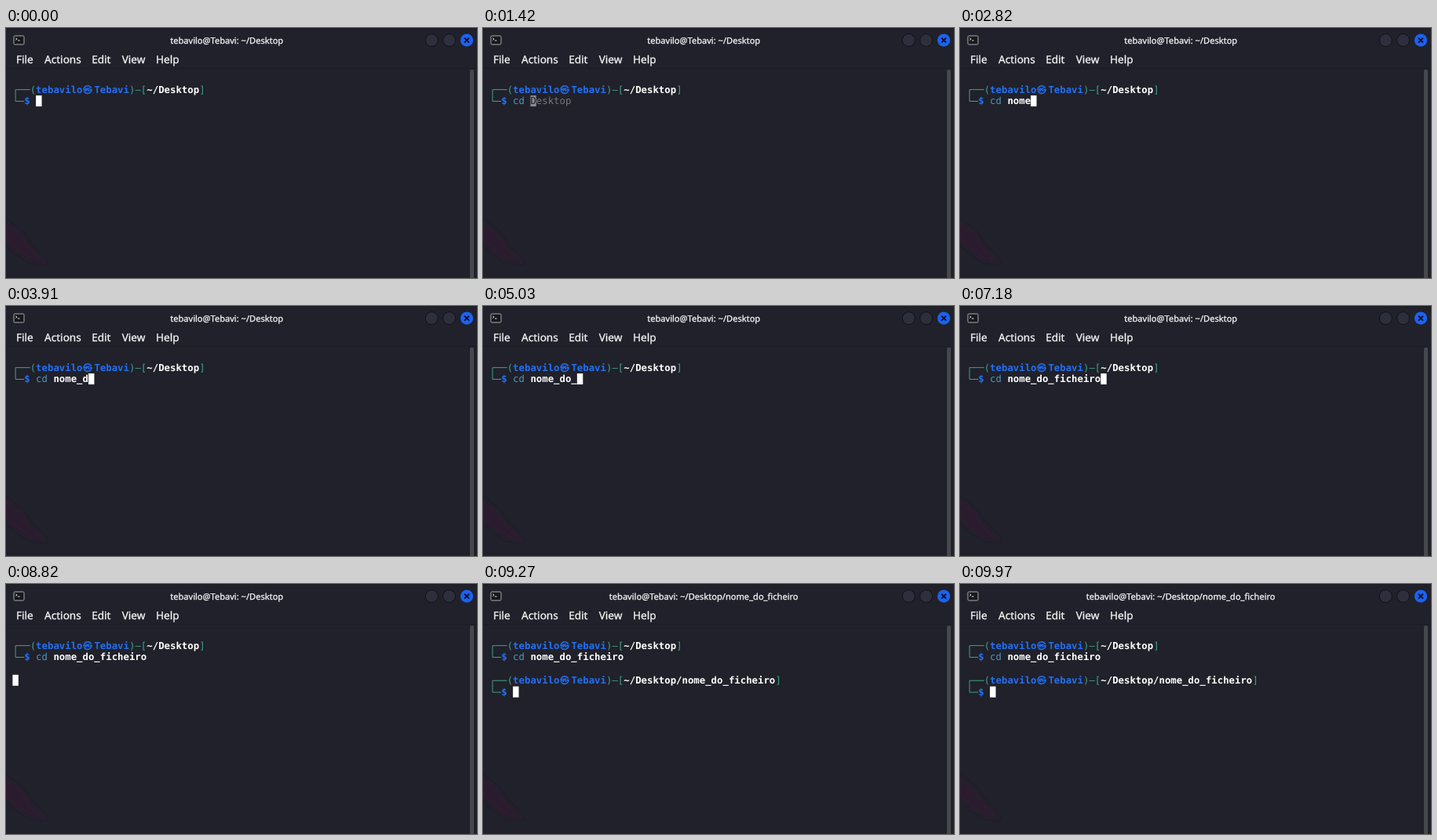
These frames come from a looping animation (600x319 px, 10 s). An HTML page:

```html
<!DOCTYPE html>
<html lang="en">
<head>
<meta charset="utf-8">
<title>Terminal</title>
<style>
  html, body { margin: 0; width: 100%; height: 100%; overflow: hidden; background: #20212a; }
  svg { display: block; width: 600px; height: 319px; text-rendering: geometricPrecision; }
  text { white-space: pre; }
  .ui { font-family: "Noto Sans", sans-serif; fill: #f4f4f5; stroke: #f4f4f5; stroke-width: .3; }
  .mono { font: 12.34px "DejaVu Sans Mono", monospace; }
  .cjk { font: 700 11.6px "Noto Sans CJK JP", "Noto Sans CJK", sans-serif; stroke: #2470f5; stroke-width: .4; }
  .bold { font-weight: 700; }
  .green { fill: #43a18a; }
  .blue { fill: #2470f5; }
  .cmd { fill: #4b98c6; }
  .white { fill: #fff; }
  .ghost { fill: #77787c; }
  .dark { fill: #20212a; }
</style>
</head>
<body>
<svg id="stage" viewBox="0 0 600 319">
  <defs>
    <filter id="soft"><feGaussianBlur stdDeviation="2"/></filter>
  </defs>
  <rect width="600" height="319" fill="#20212a"/>
  <path d="M0 .5H600M0 51.5H600" stroke="#1b1c24"/>
  <path d="M-4 243L20 262L30 277L52 300L32 298L12 285L-4 268Z" fill="#291d2f" filter="url(#soft)"/>
  <rect x="591" y="53" width="5" height="268" rx="2" fill="#47484c"/>

  <rect x="10" y="10" width="13" height="11" rx="1.2" fill="#17181d" stroke="#a9abad"/>
  <path d="M12.3 12.7l1.8 1.4-1.8 1.4M15 16h2.6" fill="none" stroke="#eee" stroke-width=".9"/>

  <g fill="#2d303c" stroke="#0f1016">
    <circle cx="542.3" cy="15.6" r="8"/>
    <circle cx="564.6" cy="15.6" r="8"/>
  </g>
  <circle cx="587" cy="15.6" r="8.1" fill="#1b62f2"/>
  <path d="M584 12.6l6 6m0-6l-6 6" stroke="#0b0f22" stroke-width="1.9"/>

  <text id="title" class="ui" x="281.2" y="19.5" font-size="11.1" text-anchor="middle"></text>
  <g class="ui" font-size="13.6">
    <text x="13" y="45.3">File</text>
    <text x="49" y="45.3">Actions</text>
    <text x="109.2" y="45.3">Edit</text>
    <text x="147.7" y="45.3">View</text>
    <text x="191" y="45.3">Help</text>
  </g>
  <g id="term"></g>
</svg>
<script>
const LOOP = 10000, ENTER = 8790, DONE = 8850;
const CELL = 7.43, ROW = 14.87, LEFT = 8.4, TOP = 71.2, ASCENT = 11.4;
const USER = 'tebavilo', HOST = 'Tebavi', HOME = '~/Desktop', DIR = 'nome_do_ficheiro';
const LINE = 'cd ' + DIR, HINT = 'cd Desktop';
const KEYS = [700, 950, 1250, 2000, 2230, 2450, 2700, 3400, 3850, 4130, 4750,
              5400, 5650, 5900, 6150, 6400, 6600, 6800, 7000];

const term = document.getElementById('term');
const title = document.getElementById('title');

function add(parent, tag, attrs, text) {
  const el = document.createElementNS('http://www.w3.org/2000/svg', tag);
  for (const k in attrs) el.setAttribute(k, attrs[k]);
  if (text) el.textContent = text;
  return parent.appendChild(el);
}
const px = col => LEFT + col * CELL;
const py = row => TOP + row * ROW;

function put(parent, col, row, text, cls) {
  return add(parent, 'text', { x: px(col), y: py(row) + ASCENT, class: 'mono ' + cls }, text);
}

function prompt(row, path) {
  const g = add(term, 'g', {});
  const x = px(.5), y = py(row) + ROW / 2;
  add(g, 'path', {
    d: `M${px(3)} ${y}H${x}V${y + ROW}H${px(2)}`,
    fill: 'none', stroke: '#43a18a', 'stroke-width': 1
  });
  put(g, 3, row, '(', 'green');
  put(g, 4, row, USER, 'blue bold');
  add(g, 'text', { x: px(12) + .6, y: py(row) + ASCENT, class: 'cjk blue' }, '㉿');
  put(g, 14, row, HOST, 'blue bold');
  put(g, 20, row, ')–[', 'green');
  put(g, 23, row, path, 'white bold');
  put(g, 23 + path.length, row, ']', 'green');
  put(g, 2, row + 1, '$', 'blue bold');
  return g;
}

prompt(0, HOME);
const nextPrompt = prompt(3, HOME + '/' + DIR);
const cmd = put(term, 4, 1, '', 'cmd');
const arg = put(term, 7, 1, '', 'white bold');
const ghost = put(term, 4, 1, '', 'ghost');
const cursor = add(term, 'rect', { width: CELL, height: 14 });
const under = put(term, 4, 1, '', 'dark');

function draw(t) {
  const n = KEYS.filter(k => k <= t).length;
  const typed = LINE.slice(0, n);
  const hint = n && HINT.startsWith(typed) ? HINT.slice(n) : '';

  cmd.textContent = typed.slice(0, 2);
  cmd.setAttribute('class', n > 1 ? 'mono cmd' : 'mono white bold');
  arg.textContent = typed.slice(3);
  ghost.textContent = hint.slice(1);
  ghost.setAttribute('x', px(5 + n));
  under.textContent = hint.slice(0, 1);
  under.setAttribute('x', px(4 + n));

  const done = t >= DONE;
  const [col, row] = done ? [4, 4] : t >= ENTER ? [0, 3] : [4 + n, 1];
  cursor.setAttribute('x', px(col));
  cursor.setAttribute('y', py(row));
  cursor.setAttribute('fill', hint ? '#88898d' : '#fff');
  nextPrompt.setAttribute('visibility', done ? 'visible' : 'hidden');
  title.textContent = `${USER}@${HOST}: ${HOME}${done ? '/' + DIR : ''}`;
}

const start = performance.now();
function tick() {
  draw((performance.now() - start) % LOOP);
  requestAnimationFrame(tick);
}
tick();
</script>
</body>
</html>
```
